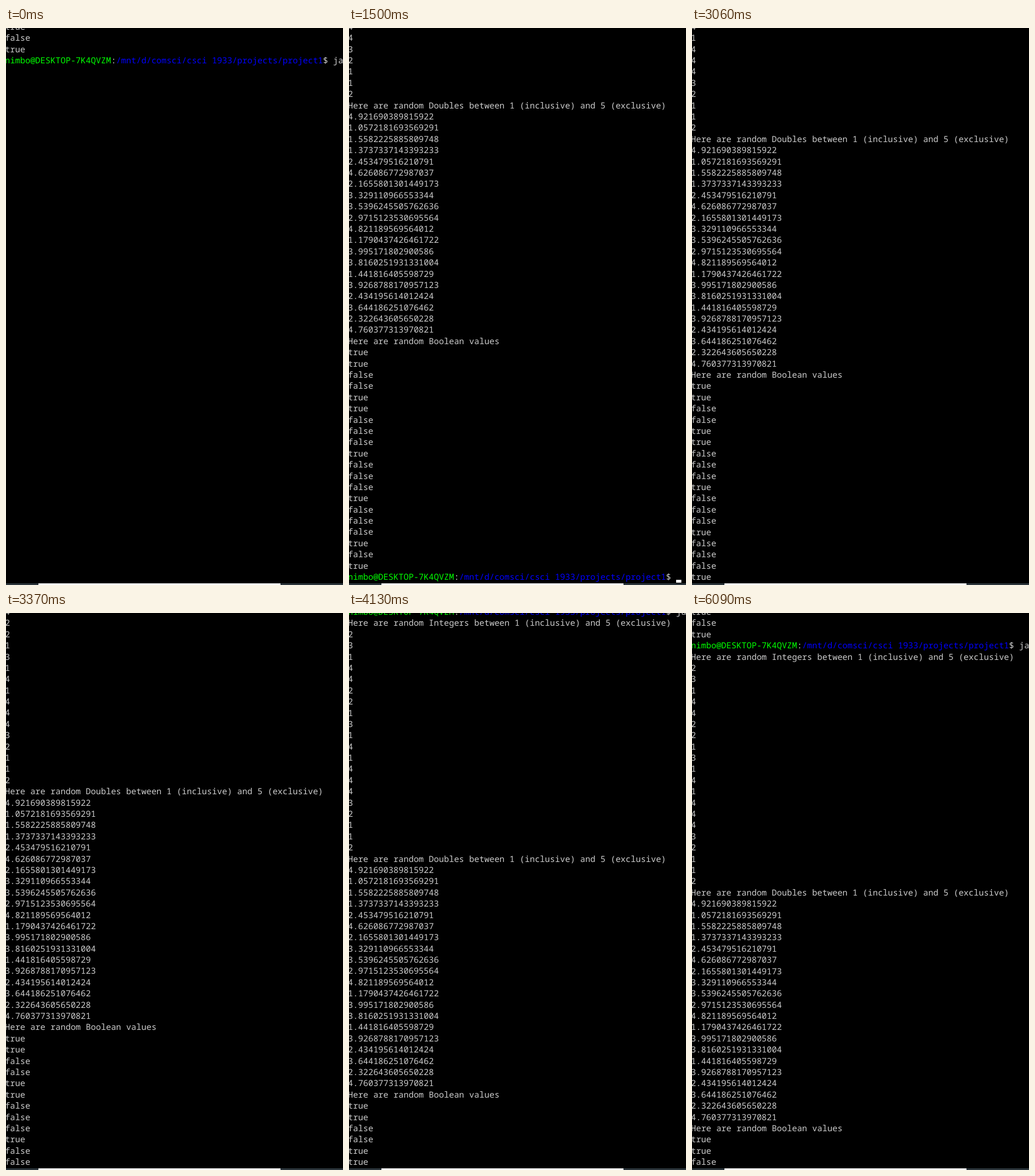
Write an HTML page that moves like this. It is 582 by 962 pixels and loops after 6.39 s.

```html
<!DOCTYPE html>
<html lang="en">
<head>
<meta charset="utf-8">
<title>Terminal session</title>
<style>
  html, body {
    margin: 0;
    width: 100%;
    height: 100%;
    overflow: hidden;
    background: #000;
  }
  #stage {
    position: relative;
    width: 100%;
    height: 100%;
    overflow: hidden;
    contain: strict;
  }
  #stage * { position: absolute; }
  #terminal {
    left: -1.7px;
    margin: 0;
    color: #ccc;
    font: 14.54px/19.396px "Noto Sans Mono", monospace;
    text-rendering: geometricPrecision;
  }
  #stage #terminal span { position: static; }
  .user { color: #0f0; }
  .path { color: #00f; }
  #cursor {
    width: 8.72px;
    height: 5px;
    background: #fff;
  }
  #taskbar {
    top: 959px;
    width: 100%;
    height: 3px;
    background: #2a343a;
  }
  #search {
    left: 56px;
    width: 418px;
    height: 3px;
    background: #fff;
    box-shadow: inset 0 1px #d8d8d8;
  }
  #hover {
    left: 535px;
    width: 47px;
    height: 3px;
    background: #414a50;
  }
</style>
</head>
<body>
<div id="stage">
  <pre id="terminal"></pre>
  <div id="cursor"></div>
  <div id="taskbar"><div id="search"></div><div id="hover"></div></div>
</div>
<script>
const LOOP = 6390;
const ROW = 19.396;
const COLUMN = 8.723;
const LEFT = -1.7;
const TOP = -11;

// The program prints, then each wheel notch scrolls back three rows.
const PRINTED = 1500;
const NOTCHES = [3060, 3290, 3370, 3980, 4130, 4450];
const NOTCH_ROWS = 3;

const prompt = '<span class="user">nimbo@DESKTOP-7K4QVZM</span>:' +
  '<span class="path">/mnt/d/comsci/csci 1933/projects/project1</span>$ ';

const fraction = seed => {
  const x = Math.sin(seed * 12.9898) * 43758.5453;
  return x - Math.floor(x);
};
const heading = type => `Here are random ${type} between 1 (inclusive) and 5 (exclusive)`;

const integers = [...'23144221314144432112'];
const doubles = [...'41112423324133132324'].map((digit, i) => +digit + fraction(i + 1));
const booleans = [...'ttffttffftffftffftft'].map(b => b === 't' ? 'true' : 'false');

const history = ['true', 'false', 'true', prompt + 'ja'].join('\n');
const output = [
  heading('Integers'), ...integers,
  heading('Doubles'), ...doubles,
  'Here are random Boolean values', ...booleans,
  prompt
].join('\n');

const byId = id => document.getElementById(id);
const terminal = byId('terminal');
const cursor = byId('cursor');
const hover = byId('hover');
terminal.innerHTML = `${history}\n<span id="output">${output}</span>`;
const outputNode = byId('output');

const within = (t, start, end) => t >= start && t < end;
const show = (node, visible) => {
  node.style.visibility = visible ? 'visible' : 'hidden';
};

function placeCursor(column, row) {
  cursor.style.left = LEFT + column * COLUMN + 'px';
  cursor.style.top = 2.8 + row * ROW + 'px';
}

function render(t) {
  const printed = t >= PRINTED;
  const notchesLeft = NOTCHES.filter(time => t < time).length;
  const offset = printed ? NOTCH_ROWS * notchesLeft : 0;
  terminal.style.top = TOP - offset * ROW + 'px';
  show(outputNode, printed);

  if (printed) placeCursor(65, 49);
  else placeCursor(0, 4);
  show(cursor, within(t, 1270, 2200) || within(t, 2660, NOTCHES[0]));
  show(hover, within(t, 5820, 6090));
}

const start = performance.now();
function tick() {
  render((performance.now() - start) % LOOP);
  requestAnimationFrame(tick);
}
tick();
</script>
</body>
</html>
```
